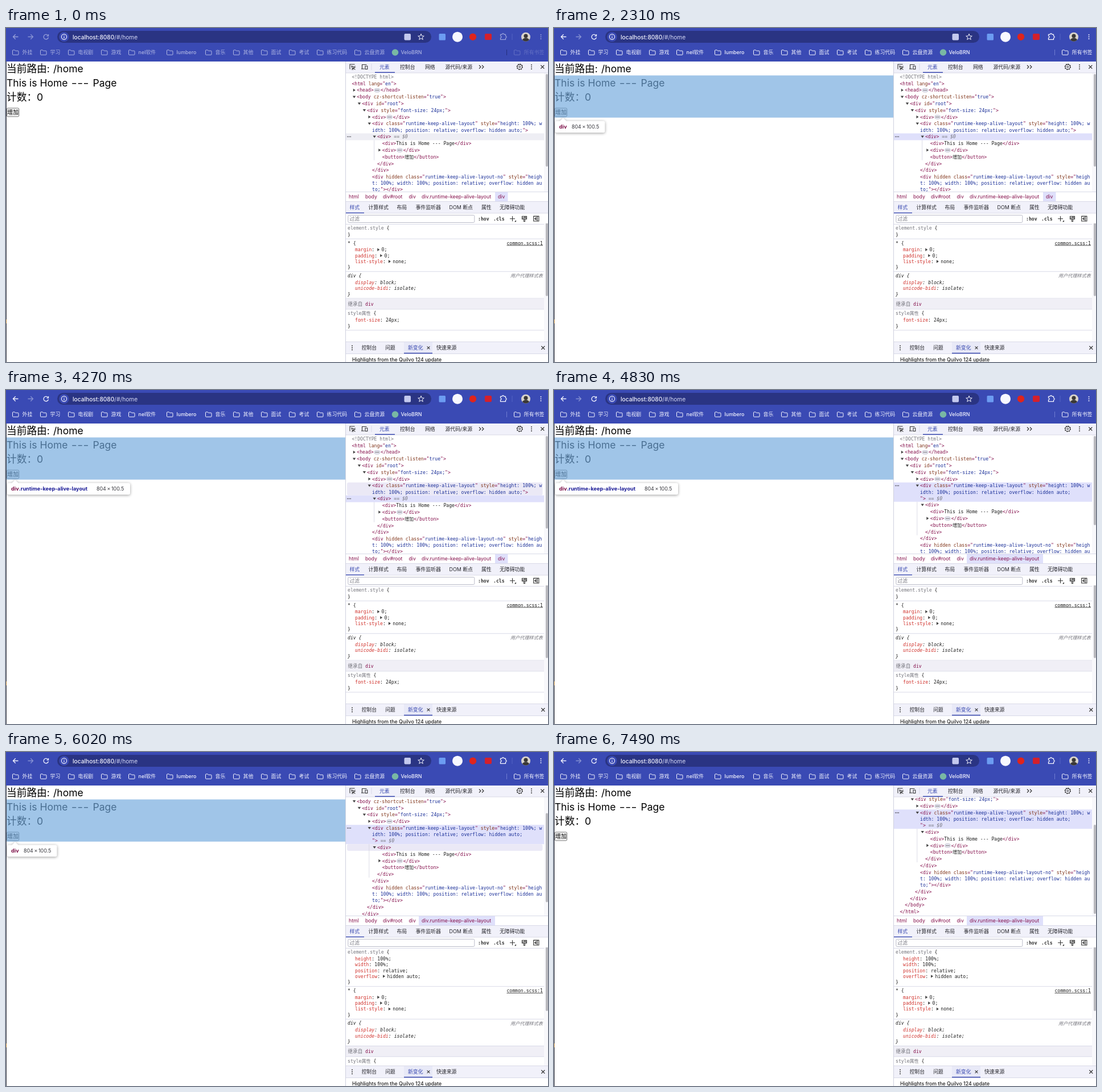
Write an HTML page with a canvas that moves like this. It is 952 px wide and 588 px high and loops after 8 s.

```html
<!DOCTYPE html>
<html lang="zh">
<head>
<meta charset="utf-8">
<title>Route cache demo</title>
<style>
html, body { margin: 0; width: 100%; height: 100%; overflow: hidden; background: #fff; }
canvas { display: block; width: 952px; height: 588px; }
</style>
</head>
<body>
<canvas id="stage"></canvas>
<script>
const W = 952, H = 588, LOOP = 8000, TOP = 59;
const canvas = document.getElementById('stage');
const ctx = canvas.getContext('2d');
const dpr = window.devicePixelRatio || 1;
canvas.width = W * dpr;
canvas.height = H * dpr;

const SANS = 'Inter, "Noto Sans CJK SC", "Noto Sans CJK", sans-serif';
const MONO = '"DejaVu Sans Mono", "Noto Sans CJK SC", "Noto Sans CJK", monospace';
const CODE = 8.15, UI = 8.9, CHAR = 4.907;
const INK = { T: '#85104c', A: '#80351a', V: '#1a2f98', K: '#1f1f1f', G: '#74747c', R: '#d0312b' };
const BAR = '#3a4ab4', PILL = '#2a3483', TINT = '#f1f1fa', LINE = '#d9dae8', ACCENT = '#3a4ab0';
const PICK = '#dfe0fb', HOVER = '#ebe9f6';

// ---- timeline: each track holds [time, value] steps
const tracks = {
  active: [[0, 0], [1820, .4], [1890, .8], [1960, 1]],
  hover: [[0, ''], [2240, 'inner'], [3640, 'text'], [4060, 'inner'], [4200, 'layout'],
    [5530, 'inner'], [6230, 'hidden'], [6580, 'close'], [6650, '']],
  scroll: [[0, 0], [5950, 9], [6020, 34.5], [6090, 61.5]],
  picked: [[0, 'inner'], [4830, 'layout']],
  styled: [[0, 'inner'], [4900, 'layout']]
};
const at = (name, t) => tracks[name].reduce((v, s) => s[0] <= t ? s[1] : v, 0);

// ---- drawing helpers
function rect(x, y, w, h, fill, r = 0, stroke) {
  ctx.beginPath();
  r ? ctx.roundRect(x, y, w, h, r) : ctx.rect(x, y, w, h);
  if (fill) { ctx.fillStyle = fill; ctx.fill(); }
  if (stroke) { ctx.strokeStyle = stroke; ctx.lineWidth = .8; ctx.stroke(); }
}
function disc(x, y, r, fill) {
  ctx.beginPath();
  ctx.arc(x, y, r, 0, Math.PI * 2);
  ctx.fillStyle = fill;
  ctx.fill();
}
function ring(x, y, r, color, w = 1) {
  ctx.beginPath();
  ctx.arc(x, y, r, 0, Math.PI * 2);
  ctx.strokeStyle = color;
  ctx.lineWidth = w;
  ctx.stroke();
}
function path(d, x, y, color, w = 1, fill) {
  const p = new Path2D(d);
  ctx.save();
  ctx.translate(x, y);
  if (fill) { ctx.fillStyle = color; ctx.fill(p); }
  else { ctx.strokeStyle = color; ctx.lineWidth = w; ctx.stroke(p); }
  ctx.restore();
}
// Draws text centred on cy and returns the x where it ends
function text(s, x, cy, color, size = UI, { face = SANS, style = '', align = 'left' } = {}) {
  ctx.font = `${style} ${size}px ${face}`;
  ctx.textAlign = align;
  ctx.fillStyle = color;
  ctx.fillText(s, x, cy + size * .37);
  return x + ctx.measureText(s).width;
}
// Coloured code: parts split by "|", first letter picks the ink, "P" is a folded-content pill
function code(src, x, cy, style = '') {
  for (const part of src.split('|')) {
    if (part[0] === 'P') {
      rect(x + 1.4, cy - 3, 9.6, 6.4, '#e9e9f3', 3, '#b8b8c8');
      for (let i = -1; i < 2; i++) disc(x + 6.2 + i * 2.3, cy + .2, .75, '#333');
      x += 12.4;
    } else x = text(part.slice(1), x, cy, INK[part[0]], CODE, { face: MONO, style });
  }
  return x;
}
const dots = (x, y, color) => [-3.4, 0, 3.4].forEach(d => disc(x, y + d, 1, color));
const cross = (x, y, s = 2.8) => path(`M${-s} ${-s}L${s} ${s}M${s} ${-s}L${-s} ${s}`, x, y, '#333', 1.1);
const arrow = (x, y, down) => path(down ? 'M-2.7 -1.8H2.7L0 2.2Z' : 'M-1.8 -2.7V2.7L2.2 0Z', x, y, '#444', 1, true);
const hline = (x, y, w, color = LINE, h = 1) => rect(x, y, w, h, color);
const faded = (a, draw) => { ctx.globalAlpha = a; draw(); ctx.globalAlpha = 1; };

// ---- browser bar
const folder = (x, color) => path('M.5 1.5Q.5 .5 1.5 .5H4.3L5.5 1.9H10Q11 1.9 11 2.9V8Q11 9 10 9H1.5Q.5 9 .5 8Z', x, 38.3, color, 1);
const bookmarks = [['外挂', 11], ['学习', 60], ['电视剧', 109], ['游戏', 167], ['nel软件', 215], ['lumbero', 282],
  ['音乐', 350], ['其他', 399], ['面试', 448], ['考试', 497], ['练习代码', 546], ['云盘资源', 612]];

function browser(active) {
  const white = '#f4f5ff', mid = .5 + .5 * active, medium = { style: '500' };
  rect(0, 0, W, TOP, BAR);
  faded(mid, () => {
    path('M4.5 0H-4.5M-.3 -4.2L-4.5 0L-.3 4.2', 17, 15.5, white, 1.3);
    path('M3.2 -2.6A4.2 4.2 0 1 0 4.1 1M4.2 -4.4V-1.4H1.2', 70.3, 15.5, white, 1.3);
    path('M-5 -3.5H-2.2A1.7 1.7 0 0 1 1.2 -3.5H4V-.7A1.7 1.7 0 0 1 4 2.7V5.5H-5V2.6A1.7 1.7 0 0 0 -5 -.8Z', 873.5, 14.8, white, 1.2);
    dots(939.5, 15.5, white);
  });
  faded(.42, () => path('M-4.5 0H4.5M.3 -4.2L4.5 0L.3 4.2', 43, 15.5, white, 1.3));

  rect(90, 5, 657, 21, PILL, 10.5);
  disc(102, 15.5, 8.6, BAR);
  ring(102, 15.5, 4.6, white, 1.1);
  path('M0 -.6V2.5M0 -2.6V-1.5', 102, 15.5, white, 1.1);
  const x = text('localhost:8080', 117, 15.8, white, 10.2, medium);
  text('/#/home', x, 15.8, '#d5d9f6', 10.2);
  rect(699.5, 10, 11.5, 11.5, '#c3c9ee', 2);
  let star = '';
  for (let i = 0; i < 10; i++) {
    const a = i * Math.PI / 5 - Math.PI / 2, r = i % 2 ? 2.4 : 5.6;
    star += (i ? 'L' : 'M') + Math.cos(a) * r + ' ' + Math.sin(a) * r;
  }
  path(star + 'Z', 729, 15.9, white, 1);

  rect(760.5, 10, 11.5, 11.5, '#6c9cf2', 1.5);
  disc(793, 15.7, 9, '#f7f8ff');
  disc(820, 15.7, 6.2, '#e0241c');
  rect(841, 10, 12, 11, '#d4202c', 2);
  rect(888.5, 10, 1, 11, '#5563c4');
  disc(913, 15.7, 8, '#d9d4cc');
  ctx.save();
  ctx.beginPath();
  ctx.arc(913, 15.7, 8, 0, 7);
  ctx.clip();
  disc(913, 14, 3.5, '#3a3836');
  disc(913, 24, 6.8, '#3a3836');
  ctx.restore();

  faded(.62 + .38 * active, () => {
    for (const [name, bx] of bookmarks) {
      folder(bx, white);
      text(name, bx + 17.6, 43, white, UI, medium);
    }
    text('VeloBRN', 693.5, 43, white, UI, medium);
  });
  disc(683.5, 43, 5.8, '#79b8a4');
  rect(879, 38, 1, 10, active > .5 ? '#6f7cd0' : '#25307c');
  faded(.22 + .78 * active, () => {
    folder(892, white);
    text('所有书签', 909.8, 43, white, UI, medium);
  });
}

// ---- page
function page(hover) {
  rect(0, TOP, 597, H - TOP, '#fff');
  text('当前路由:', 1, 71.5, '#000', 17.7);
  text('/home', 83, 71.5, '#000', 17.5);
  text('This is Home', 1, 96.5, '#000', 17.5);
  text('---', 114.5, 96.5, '#000', 23, { style: '300' });
  text('Page', 152.5, 96.5, '#000', 17.5);
  text('计数：', 1, 121, '#000', 17.7);
  text('0', 54, 121, '#000', 17.7);
  rect(1.4, 141, 21.4, 15, '#f2f2f2', 2, '#5a5a5a');
  text('增加', 2.3, 148.5, '#000', 9.9, { style: '500' });

  const tip = {
    inner: ['', '100.5', 157.8, 87.5],
    text: ['', '33', 107.8, 73],
    layout: ['.runtime-keep-alive-layout', '100.5', 157.8, 216]
  }[hover];
  if (tip) {
    const [cls, h, bottom, w] = tip;
    rect(1, 83.4, 595.5, bottom - 83.4, 'rgba(111,168,220,.66)');
    ctx.save();
    ctx.shadowColor = 'rgba(0,0,0,.4)';
    ctx.shadowBlur = 5 * dpr;
    ctx.shadowOffsetY = 1 * dpr;
    ctx.beginPath();
    ctx.roundRect(2, bottom + 6, w, 20.5, 3);
    ctx.moveTo(10, bottom + 6.2);
    ctx.lineTo(16, bottom + .5);
    ctx.lineTo(22, bottom + 6.2);
    ctx.fillStyle = '#fff';
    ctx.fill();
    ctx.restore();
    const cy = bottom + 16.2, bold = { style: 'bold' };
    let x = text('div', 9, cy, '#7d1048', 9.1, bold);
    if (cls) x = text(cls, x, cy, '#1a1a96', 9.1, bold);
    text(`804\u2009×\u2009${h}`, cls ? Math.max(x + 6.5, 159) : 31, cy, '#36363c', UI);
  }
  rect(0, TOP, 1, H - TOP, '#3b3d48');
  rect(0, 513, 1, 7, '#c08a3c');
}

// ---- element tree
const L1 = 'T<div |Aclass|T="|Vruntime-keep-alive-layout|T" |Astyle|T="|Vheight: 100%; w';
const L2 = 'Vidth: 100%; position: relative; overflow: hidden auto;';
const folded = 'T<div>|P|T</div>';
// [depth, arrow (1 open, 0 closed, -1 none), lines, key]
const tree = picked => [
  [0, -1, ['G<!DOCTYPE html>']],
  [0, -1, ['T<html |Alang|T="|Ven|T">']],
  [1, 0, ['T<head>|P|T</head>']],
  [1, 1, ['T<body |Acz-shortcut-listen|T="|Vtrue|T">']],
  [2, 1, ['T<div |Aid|T="|Vroot|T">']],
  [3, 1, ['T<div |Astyle|T="|Vfont-size: 24px;|T">']],
  [4, 0, [folded]],
  [4, 1, picked === 'layout' ? [L1, L2, 'T">'] : [L1, L2 + '|T">'], 'layout'],
  [5, 1, ['T<div>'], 'inner'],
  [6, -1, ['T<div>|KThis is Home --- Page|T</div>'], 'text'],
  [6, 0, [folded]],
  [6, -1, ['T<button>|K增加|T</button>']],
  [5, -1, ['T</div>'], 'innerEnd'],
  [4, -1, ['T</div>'], 'close'],
  [4, -1, ['T<div |Ahidden class|T="|Vruntime-keep-alive-layout-no|T" |Astyle|T="|Vheigh',
    'Vt: 100%; width: 100%; position: relative; overflow: hidden au', 'Vto;|T"></div>'], 'hidden'],
  [3, -1, ['T</div>']], [2, -1, ['T</div>']], [1, -1, ['T</body>']], [0, -1, ['T</html>']]
];
function clipped(y, h, draw) {
  ctx.save();
  ctx.beginPath();
  ctx.rect(597, y, 355, h);
  ctx.clip();
  draw();
  ctx.restore();
}
function elements({ hover, picked, scroll, active }) {
  let y = 85.8 - scroll, guide = 0;
  for (const [depth, open, lines, key] of tree(picked)) {
    const x = 607.4 + 8.9 * depth, top = y - 5.7, h = 11.8 + 11.1 * (lines.length - 1);
    const chosen = key === picked;
    if (chosen) {
      rect(597, top, 348, h, active ? PICK : '#eeeef4');
      for (let i = 0; i < 3; i++) disc(600 + i * 2.6, y, .9, '#55555e');
      guide = top + h;
    } else if (key && key === hover) rect(599, top, 343.5, h, HOVER, 3);
    if (key === (picked === 'inner' ? 'innerEnd' : 'close'))
      rect(picked === 'inner' ? 646.3 : 637.4, guide, .8, top - guide, '#d3d3e2');
    if (open >= 0) arrow(x - 4.7, y, open);
    lines.forEach((line, i) => {
      const end = code(line, x, y + 11.1 * i);
      if (chosen && i === lines.length - 1)
        text('== $0', end + CHAR, y + 11.1 * i, INK.G, CODE, { face: MONO, style: 'italic' });
    });
    y += h;
  }
  rect(945, 79, 7, 209, '#f8f8fb');
  rect(948, 81 + scroll * .765, 4, picked === 'inner' ? 163 : 157, '#b9b9be', 2);
}

// ---- style rules; a ">" before a value marks an expandable one
function rule(y, head, props, style = '') {
  code(head, 600, y, style);
  y += 11.8;
  for (const [name, value] of props) {
    code(`R${name}|K:`, 613, y, style);
    let x = 613 + (name.length + 2) * CHAR;
    if (value[0] === '>') { arrow(x + 1.8, y, false); x += CHAR * 1.5; }
    code('K' + value.replace('>', '') + ';', x, y, style);
    y += 10.35;
  }
  code('K}', 600, y, style);
  hline(597, y + 7, 348);
  return y + 14.7;
}
function styles(styled) {
  const own = [['height', '100%'], ['width', '100%'], ['position', 'relative'], ['overflow', '>hidden auto']];
  let y = rule(352, 'Gelement.style|K {', styled === 'layout' ? own : []);
  text('common.scss:1', 943, y, '#222', CODE, { face: MONO, align: 'right' });
  hline(879.5, y + 4, 63.5, '#222', .8);
  y = rule(y, 'K* {', [['margin', '>0'], ['padding', '>0'], ['list-style', '>none']]);
  text('用户代理样式表', 943, y + .3, INK.G, CODE, { align: 'right', style: 'italic' });
  y = rule(y, 'Kdiv {', [['display', 'block'], ['unicode-bidi', 'isolate']], 'italic');
  rect(597, y - 6.7, 348, 18, '#f0eff6');
  text('继承自', 600.5, y + 2.6, INK.G, 8.6);
  code('Tdiv', 631, y + 2.6);
  hline(597, y + 11.2, 348);
  rule(y + 19.2, 'Gstyle属性|K {', [['font-size', '24px']]);
  rect(945, 327, 7, 225, '#f8f8fb');
  rect(948, 328, 4, styled === 'layout' ? 128 : 144, '#b9b9be', 2);
}

// ---- developer panel
function tabs(list, cy, on) {
  for (const [name, x] of list) text(name, x, cy, name === on ? ACCENT : '#26262c');
}
function panel(s) {
  rect(596, TOP, 356, H - TOP, '#fff');
  clipped(79, 209, () => elements(s));
  clipped(344, 208, () => styles(s.styled));

  rect(597, TOP, 355, 20, TINT);
  hline(597, 78.6, 355);
  path('M4 -4.5H-4.5V4M-2 4.5H-1M4.5 -2V-1M-1.6 -1.6L4.6 .6L1.6 1.6L.6 4.6Z M1.6 1.6L4.8 4.8', 608.5, 68.5, '#333', 1.1);
  path('M-5.5 3.5H.2M-4 3V-4H4M1.5 -1.5H5.3V4H1.5Z', 629.5, 68.5, '#333', 1.1);
  rect(641.5, 63, 1, 11, LINE);
  tabs([['元素', 656], ['控制台', 692], ['网络', 736], ['源代码/来源', 771.5]], 68.5, '元素');
  hline(648, 77.6, 35, ACCENT, 1.4);
  path('M-4 -3L-1 0L-4 3M1 -3L4 0L1 3', 835, 68.5, '#333', 1.1);
  ring(902.3, 68.4, 4.3, '#333', 1.1);
  ctx.setLineDash([1.7, 2.2]);
  ring(902.3, 68.4, 5, '#333', 1.3);
  ctx.setLineDash([]);
  ring(902.3, 68.4, 1.5, '#333');
  dots(923, 68.5, '#333');
  cross(942.3, 68.5, 3);

  rect(597, 288, 355, 18, '#fff');
  hline(597, 288, 355);
  const deep = s.picked === 'layout';
  rect(deep ? 725 : 859, 289, deep ? 134 : 22.5, 16, PICK);
  [['html', 602], ['body', 631], ['div#root', 662], ['div', 707.5], ['div.runtime-keep-alive-layout', 730]]
    .forEach(([name, x]) => text(name, x, 297, INK.T, 8.75));
  if (!deep) text('div', 864, 297, INK.T, 8.75);

  rect(597, 305, 355, 21, TINT);
  hline(597, 305, 355);
  hline(597, 325.6, 355);
  tabs([['样式', 603.5], ['计算样式', 636.5], ['布局', 686.5], ['事件监听器', 719.5], ['DOM 断点', 778.5],
    ['属性', 835], ['无障碍功能', 867]], 315.7, '样式');
  hline(597, 324.8, 32, ACCENT, 1.4);
  rect(600.8, 329.5, 222, 13, '#fff', 2, '#a9aabb');
  text('过滤', 603.5, 336.2, '#80808a', 8.8);
  const bold = { face: MONO, style: 'bold' };
  text(':hov', 829, 336, '#333', CODE, bold);
  text('.cls', 856, 336, '#333', CODE, bold);
  path('M-4.5 0H4.5M0 -4.5V4.5', 889.5, 335.7, '#333', 1.1);
  path('M3.5 5.5H6.5V2.5Z', 889.5, 335.7, '#333', 1, true);
  path('M-4 -4.5H4V.5H-4ZM-4 -1.6H4M-1 .5V4.5H1V.5M0 -4.5V-2.5M2 -4.5V-2.5', 910.5, 336, '#333', 1.1);
  path('M-4.6 -4.3H4.6V4.3H-4.6ZM2 -4.3V4.3M-.2 -2L-2.6 0L-.2 2Z', 931.3, 335.7, '#333', 1.1);
  hline(597, 345, 348);

  rect(597, 552, 355, 21, TINT);
  hline(597, 552, 355);
  hline(597, 573, 355);
  rect(597, 574, 355, 14, '#fff');
  dots(608, 563, '#333');
  rect(699, 553, 50, 20, '#e8e9f7');
  tabs([['控制台', 624.5], ['问题', 666], ['新变化', 706], ['快速来源', 756]], 563, '新变化');
  hline(699, 571.8, 50, ACCENT, 1.4);
  cross(742, 563, 2.4);
  cross(943.3, 563, 3);
  text('Highlights from the Quilvo 124 update', 608, 583.3, '#1f1f1f', 8.75, { style: '500' });
  rect(596, TOP, 1, H - TOP, '#cfd0de');
}

function frame(now) {
  const t = now % LOOP, s = {};
  for (const name in tracks) s[name] = at(name, t);
  ctx.setTransform(dpr, 0, 0, dpr, 0, 0);
  ctx.clearRect(0, 0, W, H);
  page(s.hover);
  panel(s);
  browser(s.active);
  requestAnimationFrame(() => frame(performance.now() - start));
}
const start = performance.now();
frame(0);
</script>
</body>
</html>
```
